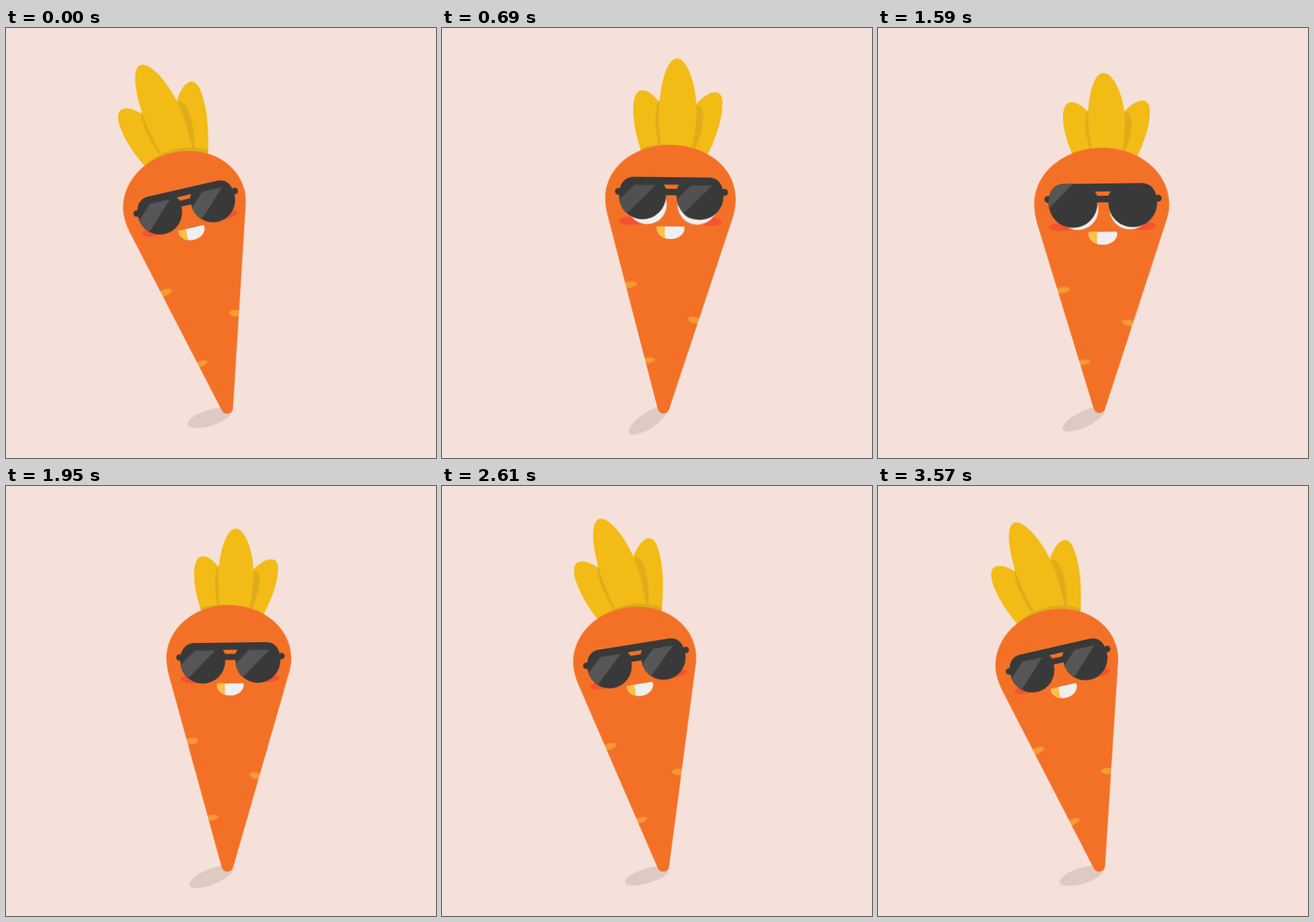
Animation of 600 by 600 pixels, one loop 3.6 s. Source, as an HTML page:

```html
<!DOCTYPE html>
<html lang="en">
<head>
<meta charset="utf-8">
<title>Cool carrot</title>
<style>
  html, body { margin: 0; width: 100%; height: 100%; overflow: hidden; background: #f5e1da; }
  svg { display: block; width: 100vw; height: 100vh; }

  .shadow, .carrot, .head, .leaves, .stretch, .body, .spots, .glasses, .shine, .sweep, .eyes, .open, .wink, .star {
    animation: 3600ms cubic-bezier(.333, 0, .667, 1) infinite;
  }
  .shadow  { animation-name: shadow; }
  .carrot  { animation-name: sway; transform-origin: 309px 532px; }
  .head    { animation-name: head; transform-origin: 316px 282px; }
  /* leaves trail behind the body, so their cycles are shifted */
  .leaves  { animation-name: lag; animation-delay: -3473ms; transform-origin: 322px 175px; }
  .stretch { animation-name: stretch; animation-delay: -3517ms; transform-origin: 322px 175px; }
  .body    { animation-name: body; }
  .spots   { animation-name: spots; transform-origin: 309px 534px; }
  .glasses { animation-name: lift; }
  .shine   { animation-name: shine; }
  .sweep   { animation-name: sweep; animation-timing-function: linear; }
  .eyes    { animation-name: eyes; animation-timing-function: step-end; }
  .open    { animation-name: open; animation-timing-function: step-end; }
  .wink    { animation-name: wink; animation-timing-function: step-end; }
  .star    { animation-name: star; }

  @keyframes sway {
    0%, 66.667%, 100% { transform: rotate(-13deg); }
    16.667% { transform: rotate(1deg); }
    33.333% { transform: rotate(-6.2deg); }
    50% { transform: rotate(1.5deg); }
    83.333% { transform: rotate(.9deg); }
  }
  @keyframes shadow {
    0%, 100% { transform: translate(284px, 544px) rotate(-17deg); }
    16.667% { transform: translate(288px, 547px) rotate(-33.5deg); }
    19.167% { transform: translate(288px, 547.5px) rotate(-34deg); }
    30.833% { transform: translate(286px, 547px) rotate(-28deg); }
    44.167% { transform: translate(287px, 546px) rotate(-26deg); }
    62.5% { transform: translate(285px, 545px) rotate(-18deg); }
    83.333% { transform: translate(287px, 543px) rotate(-15.5deg) scaleY(.87); }
  }
  @keyframes head {
    0%, 11.667% { transform: translateY(0) scale(1); animation-timing-function: ease-in; }
    19.167% { transform: translateY(3px) scale(1.056); animation-timing-function: ease-out; }
    29.167%, 41.111% { transform: translateY(12px) scale(1.105); }
    57.778%, 100% { transform: translateY(0) scale(1); }
  }
  @keyframes body {
    0%, 11.667% {
      d: path("M229 240C229 198 267 166 314 166C362 166 401 198 401 240Q401 251 397 263L317 532Q315 538 309 538Q303 538 301 532L232 262Q229 250 229 240Z");
      animation-timing-function: ease-in;
    }
    19.167% {
      d: path("M225 238C225 194 266 163 315.5 163C366 163 407 194 407 238Q407 251 403 264L317 531.5Q315 538 309 538Q303 538 301 531.5L229 264Q225 250 225 238Z");
      animation-timing-function: ease-out;
    }
    29.167%, 41.111% {
      d: path("M220.5 247C220.5 202 263 167.5 315.5 167.5C368 167.5 410.5 202 410.5 247Q410.5 259 406 271L317 531Q315 537 309 537Q303 537 301 531L223.5 270Q220.5 258 220.5 247Z");
    }
    57.778%, 100% {
      d: path("M229 240C229 198 267 166 314 166C362 166 401 198 401 240Q401 251 397 263L317 532Q315 538 309 538Q303 538 301 532L232 262Q229 250 229 240Z");
    }
  }
  @keyframes spots {
    0%, 11.667% { transform: scale(1); animation-timing-function: ease-in; }
    19.167% { transform: scale(1.01, .975); animation-timing-function: ease-out; }
    29.167%, 41.111% { transform: scale(1.03, .932); }
    57.778%, 100% { transform: scale(1); }
  }
  @keyframes lag {
    0%, 66.667%, 100% { transform: rotate(-10.6deg); }
    16.667% { transform: rotate(1.2deg); }
    30% { transform: rotate(-6.6deg); }
    49.25% { transform: rotate(3.6deg); }
    83.333% { transform: rotate(2.96deg); }
  }
  @keyframes stretch {
    0%, 66.667%, 100% { transform: translateY(-5px) scale(1.02, 1.09); }
    13.25% { transform: translateY(0) scale(.99, 1.02); }
    28.5% { transform: translateY(0) scale(.88, .765); }
    33.8% { transform: translateY(0) scale(.88, .74); }
    49.4% { transform: translateY(0) scale(.95, .9); }
    83.333% { transform: translateY(0) scale(1); }
  }
  @keyframes lift {
    0%, 15.556% { transform: translateY(0); }
    27.222%, 37.778% { transform: translateY(-38.5px); }
    46.111%, 100% { transform: translateY(0); }
  }
  @keyframes shine {
    0%, 17.5% { opacity: 1; }
    23.889%, 45.556% { opacity: 0; }
    52.778%, 100% { opacity: 1; }
  }
  @keyframes sweep {
    0%, 42.3% { transform: translateX(0); }
    54.5%, 100% { transform: translateX(240px); }
  }
  @keyframes eyes {
    0%, 46.667%, 100% { opacity: 0; }
    15.556% { opacity: 1; }
  }
  @keyframes open {
    0%, 38.333%, 100% { opacity: 1; }
    28.333% { opacity: 0; }
  }
  @keyframes wink {
    0%, 38.333%, 100% { opacity: 0; }
    28.333% { opacity: 1; }
  }
  @keyframes star {
    0%, 28.333% { transform: translate(299px, 278px) rotate(10deg) scale(0); }
    33.333% { transform: translate(299px, 278px) rotate(100deg) scale(1.3); }
    38.889%, 100% { transform: translate(299px, 278px) rotate(190deg) scale(0); }
  }
</style>
</head>
<body>
<svg viewBox="0 0 600 600">
  <defs>
    <path id="leafL" d="M275 94C286 94 300 108 306 125L312 203H287L279 185C271 165 263 142 263 117C263 102 268 94 275 94Z"/>
    <path id="leafR" d="M374 94C381 94 384 101 384 109C384 133 375 158 364 182L352 206H336L345 115C352 105 364 94 374 94Z"/>
    <path id="leafC" d="M320.5 50C335 50 349 88 349 122C349 145 346 160 343 180L340 200H307L304 180C301 160 298 143 298 122C298 86 307 50 320.5 50Z"/>
    <path id="rims" fill-rule="evenodd" clip-rule="evenodd" d="M248 243C248 226 256 218 268 218H366C378 218 386 226 386 243A31 31 0 0 1 324 243V242H310V243A31 31 0 0 1 248 243ZM307 228H327L324 233.500H310Z"/>
    <path id="smile" d="M300 274H333Q335 274 335 276C335 285 326 291 316.500 291C307 291 298 285 298 276Q298 274 300 274Z"/>
    <g id="eye">
      <circle r="26" fill="#f0f0f1"/>
      <circle cx="-3.500" r="18.500" fill="#3a3a3a"/>
      <ellipse cx="-14" cy="-2" rx="6" ry="9" transform="rotate(18 -14 -2)" fill="#f0f0f1"/>
    </g>
    <clipPath id="leafClip"><use href="#leafL"/><use href="#leafR"/><use href="#leafC"/></clipPath>
    <clipPath id="bodyClip"><path class="body"/></clipPath>
    <clipPath id="rimClip"><use href="#rims"/></clipPath>
    <clipPath id="lensClip"><circle cx="279" cy="243" r="31"/><circle cx="355" cy="243" r="31"/></clipPath>
    <clipPath id="smileClip"><use href="#smile"/></clipPath>
  </defs>

  <rect width="600" height="600" fill="#f5e1da"/>
  <ellipse class="shadow" rx="32" ry="11" fill="#dccac3"/>

  <g class="carrot">
    <g class="head"><g class="leaves"><g class="stretch">
      <g fill="#f2bb16"><use href="#leafL"/><use href="#leafR"/></g>
      <g fill="#dfac1b">
        <path d="M298 107C291 118 293 146 301 175H312V115Z"/>
        <path d="M346 113C357 109 360 122 357 140C355 155 350 166 347 176H338Z"/>
      </g>
      <use href="#leafC" fill="#f2bb16"/>
      <g clip-path="url(#leafClip)"><ellipse cx="308" cy="245" rx="86" ry="79" fill="#dfac1b"/></g>
    </g></g></g>

    <g clip-path="url(#bodyClip)">
      <rect x="200" y="150" width="230" height="400" fill="#f37126"/>
      <g class="spots" fill="#f69b32">
        <ellipse cx="260" cy="354" rx="11" ry="4.500" transform="rotate(-8 260 354)"/>
        <ellipse cx="351" cy="404" rx="10" ry="4.500" transform="rotate(14 351 404)"/>
        <ellipse cx="287" cy="462" rx="10" ry="4" transform="rotate(-8 287 462)"/>
      </g>
    </g>

    <g class="head">
      <g fill="#f5522f">
        <ellipse cx="264" cy="267.500" rx="16" ry="5.500"/>
        <ellipse cx="369" cy="267.500" rx="15.500" ry="5.500"/>
      </g>
      <g clip-path="url(#smileClip)">
        <rect x="296" y="272" width="42" height="22" fill="#efeff0"/>
        <rect x="296" y="272" width="13" height="22" fill="#fcc145"/>
      </g>
      <path class="star" fill="#fbfbfb" d="M0-10Q2.500-2.500 10 0Q2.500 2.500 0 10Q-2.500 2.500-10 0Q-2.500-2.500 0-10Z"/>
      <g class="eyes">
        <use href="#eye" class="open" x="285" y="245.500"/>
        <path class="wink" d="M270.500 257A16.500 16.500 0 0 1 303.500 257" fill="none" stroke="#3a3a3a" stroke-width="8.500" stroke-linecap="round"/>
        <use href="#eye" x="351.500" y="245.500"/>
      </g>
      <g class="glasses">
        <g fill="#393939">
          <circle cx="247" cy="237.500" r="4.500"/>
          <circle cx="387.500" cy="237.500" r="4.500"/>
          <rect x="246" y="234" width="142" height="7.500"/>
          <use href="#rims"/>
        </g>
        <g clip-path="url(#lensClip)"><g class="shine" fill="#565656">
          <path d="M268 228.500H296.500L257 268L228 268Z"/>
          <path d="M343 228.500H371L331.500 268L303 268Z"/>
        </g></g>
        <g clip-path="url(#rimClip)"><path class="sweep" fill="#565656" d="M222 210H250L175 285H147Z"/></g>
      </g>
    </g>
  </g>
</svg>
</body>
</html>
```
